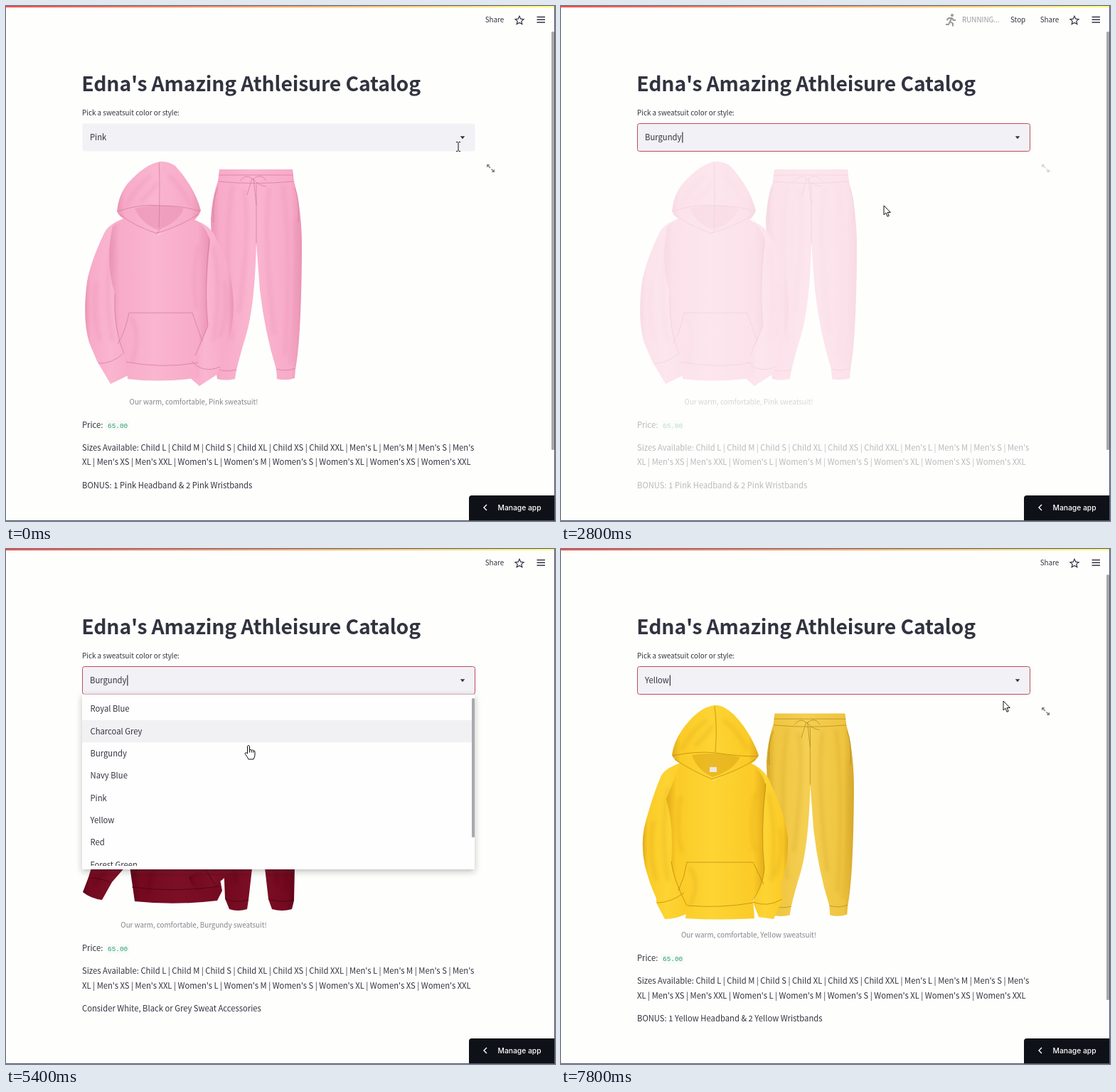
These frames come from a looping animation (772x725 px, 8000 ms). An HTML page:

```html
<!DOCTYPE html>
<html lang="en">
<head>
<meta charset="utf-8">
<title>Athleisure Catalog</title>
<style>
  html, body { margin: 0; width: 100%; height: 100%; overflow: hidden; background: #fefefd; }
  svg { display: block; }
  text { font: 11.26px "Noto Sans CJK JP", "Noto Sans CJK SC", "Noto Sans CJK KR", "Open Sans", sans-serif; fill: #31333f; white-space: pre; }
  .small { font-size: 9.84px; }
  .title { font-size: 28.35px; font-weight: 700; letter-spacing: -.005em; }
  .price { font: 9.4px "Liberation Mono", monospace; fill: #27a063; }
  .manage { font: 500 10.3px Inter, sans-serif; fill: #fff; }
  .status { font: 9.75px "Open Sans", sans-serif; fill: #e4e4e6; }
  .ink { fill: none; stroke: #31333f; stroke-width: 1.2; }
</style>
</head>
<body>
<svg id="stage" width="772" height="725" viewBox="0 0 772 725"></svg>
<script>
const options = ["Royal Blue", "Charcoal Grey", "Burgundy", "Navy Blue", "Pink", "Yellow", "Red", "Forest Green"];
const rowY = i => 209.5 + i * 31.35;
const stage = document.getElementById("stage");

// Layers: f = shaded fill, d = inner fill, s = soft fold, l = seam, t = label
const widePants = [
  "f M300 230H403L405 247Q417 290 416 350Q415 470 407 511L406 524Q394 528 381 525L380 511Q364 460 357 400L352 334Q350 420 338 462Q328 495 324 513L322 525Q309 528 297 525L294 500L288 300Q290 268 298 247Z",
  "s M318 255Q306 330 318 470M335 260Q344 310 328 430M370 258Q361 320 377 460M390 255Q402 350 392 490M408 300Q410 400 400 500",
  "l M298 247Q350 252 405 247M299 238H404M352 250V334M298 256Q290 270 292 305M406 256Q413 270 411 305M297 511Q310 516 324 512M380 511Q394 515 407 510M329 246Q338 235 347 244Q359 234 366 246M346 243L339 266M348 243L352 280M347 243Q355 253 366 254"
];
const pinkHoodie = [
  "f M166 299Q143 307 137 322Q119 360 114 388Q107 440 117 474L128 500L147 532L172 520L171 495L190 400Z",
  "f M262 300Q290 309 296 329Q316 362 319 406Q323 440 310 482L298 518L272 535L249 515L270 490L262 400Z",
  "f M166 299L214 322L262 299Q283 310 287 332Q279 400 284 450L271 486L272 523Q220 531 171 525Q170 506 166 490Q151 455 153 405Q139 360 150 310Z",
  "s M150 330Q137 400 149 470M127 390Q121 430 132 470M292 340Q303 400 292 470M307 390Q314 425 301 465M178 500Q190 460 176 440M270 340Q261 385 268 425",
  "l M166 490Q151 455 153 405M286 326Q278 400 284 450L266 492M173 432H262L276 472M173 432Q168 458 157 476M169 501Q220 511 270 502M130 503Q148 504 164 490M261 500Q277 518 301 508",
  "f M217 219Q196 222 171 250Q158 266 156 289Q160 300 184 309L212 322L252 309Q270 301 274 288Q266 256 238 225Q228 218 217 219Z",
  "d M181 285Q215 276 250 285Q242 306 213 315Q190 306 181 285Z",
  "s M170 280Q184 255 202 240M259 280Q246 253 230 240M190 274Q203 264 212 250",
  "l M215 220Q217 250 215 312M157 289Q190 278 215 281Q250 281 273 289M160 293Q180 310 212 320Q252 307 270 293M212 321L217 313"
];
const yellowHoodie = [
  "f M168 301Q145 309 140 321Q127 352 117 392Q112 418 118 446Q124 470 134 492V498L146 521Q163 521 180 512L175 480L190 400Z",
  "f M266 301Q289 311 296 333Q315 374 319 408Q320 440 309 474L312 493L299 521L278 518L270 497L280 470L262 400Z",
  "f M168 301L214 326L264 301Q284 312 288 334Q280 400 286 450Q284 474 270 494L272 520Q225 523 175 520L177 502Q161 480 155 440Q159 390 148 352Z",
  "s M150 338Q140 400 150 465M130 385Q122 425 134 465M292 345Q304 400 296 465M308 395Q314 425 302 458M168 350Q161 395 170 425M273 345Q266 390 272 425M182 500Q196 470 182 450",
  "l M155 440Q158 465 177 502M288 330Q280 400 286 450Q284 474 270 494M177 441H270L285 472M177 441Q174 462 165 481M178 502Q225 506 270 498M135 498Q154 498 173 484M270 497Q290 505 311 493",
  "f M217 220Q200 221 182 240Q159 265 156 290Q160 301 184 310L213 326L252 309Q274 302 278 290Q266 257 243 233Q228 219 217 220Z",
  "d M184 290Q216 285 252 293Q242 312 213 321Q191 311 184 290Z",
  "s M170 281Q184 256 203 242M261 281Q247 254 230 242M190 275Q203 264 212 250",
  "l M216 221Q220 250 217 286M157 291Q190 284 217 287Q250 292 277 292M160 296Q182 311 212 324Q252 311 273 296",
  "t M209 307H219V314H209Z"
];
const slimPants = [
  "f M308 226H400L403 245Q410 290 408 350L405 495L402 507Q388 511 374 507L369 493L355 370L341 494L339 507Q326 511 314 507L308 492L301 310Q301 260 308 226Z",
  "s M318 260Q313 350 323 470M338 260Q344 330 331 450M373 260Q366 330 382 470M395 260Q400 350 393 480",
  "l M306 239Q350 243 402 239M307 232H401M354 242L355 372M309 247Q302 265 305 300M403 248Q408 270 406 300M308 493Q325 499 341 494M369 493Q388 499 405 494M342 240Q350 229 356 239Q364 229 371 240M355 238L344 258M357 238L364 262"
];
const slimHoodie = [
  "f M203 294Q178 305 169 323Q149 358 140 398L137 424Q121 440 116 462L108 483Q119 492 135 494L149 469L175 439L186 350Z",
  "f M204 292L240 318L286 294Q307 308 317 335Q331 375 329 414L300 460L304 481L297 495Q238 502 181 496L173 440Q181 380 177 340Q187 308 204 292Z",
  "f M316 340Q333 384 330 420Q328 447 313 458Q294 475 273 486Q262 477 257 462L281 447Q310 422 316 340Z",
  "s M194 335Q186 390 190 420M282 345Q292 390 280 424M161 380Q148 420 158 444M126 470L149 440M207 450L200 482M311 405Q312 432 291 454M270 370L255 405",
  "l M203 298Q175 322 181 370L173 440M192 416Q239 421 287 416L291 444M192 416L184 450L182 459M177 476Q240 484 300 475M116 463Q135 463 148 470M279 448Q287 462 294 473M317 343Q307 420 282 446",
  "f M241 228Q228 229 210 246Q194 262 190 286Q198 297 220 298L239 310L263 298Q285 295 290 284Q282 253 260 235Q251 227 241 228Z",
  "d M205 294Q240 280 276 293L241 315Z",
  "s M207 276Q220 253 235 245M276 275Q264 253 250 244",
  "l M240 228Q244 250 239 281M191 288Q215 281 240 283Q266 280 289 286M195 294Q218 300 238 315Q260 297 284 293M233 317Q240 306 242 318Q237 328 232 320M243 317Q247 308 251 317Q249 328 242 319",
  "t M234 300H243V307H234Z"
];

function garment(id, [light, base, dark, seam], layers, transform = "") {
  const stops = [[0, dark], [.1, base], [.45, light], [.88, base], [1, dark]];
  const paint = {
    f: `fill="url(#${id})"`,
    d: `fill="${dark}" opacity=".6"`,
    s: `fill="none" stroke="${dark}" stroke-width="5" stroke-linecap="round" opacity=".35" filter="url(#soft)"`,
    l: `fill="none" stroke="${seam}" stroke-width="1" opacity=".7"`,
    t: `fill="#eee8e0"`
  };
  return `<linearGradient id="${id}">${stops.map(([o, c]) => `<stop offset="${o}" stop-color="${c}"/>`).join("")}</linearGradient>
    <g transform="${transform}">${layers.map(s => `<path d="${s.slice(2)}" ${paint[s[0]]}/>`).join("")}</g>`;
}
const label = (x, y, s, cls = "", id = "") => `<text x="${x}" y="${y}" class="${cls}" id="${id}">${s}</text>`;

const pink = ["#fab5cf", "#f7abc8", "#e993b3", "#d2779b"];
const burgundy = ["#7c0f26", "#74091f", "#5a0617", "#3d0410"];
const yellow = ["#fdd433", "#fbcb27", "#e0a91a", "#b5830a"];
const paleYellow = ["#f5cf52", "#efc540", "#d6a62b", "#ad8118"];

stage.innerHTML = `
<defs>
  <linearGradient id="bar"><stop stop-color="#ff4b4b"/><stop offset="1" stop-color="#fffd80"/></linearGradient>
  <filter id="soft" x="-20%" y="-20%" width="140%" height="140%"><feGaussianBlur stdDeviation="2.5"/></filter>
  <filter id="shadow" x="-5%" y="-10%" width="110%" height="125%"><feDropShadow dx="0" dy="3" stdDeviation="4" flood-color="#262730" flood-opacity=".3"/></filter>
  <clipPath id="listClip"><path d="M107 205H655V446H107Z"/></clipPath>
</defs>
<path d="M0 0H772V725H0Z" fill="#fefefd"/>
<path d="M0 0H771V2H0Z" fill="url(#bar)"/>
<g id="running">
  <g fill="#999"><circle id="head" cy="13" r="2.1"/><path id="pose" fill="none" stroke="#999" stroke-width="2" stroke-linejoin="round"/></g>
  <g opacity=".5">${label(564, 23, "RUNNING...", "small")}</g>${label(632, 23, "Stop", "small")}
</g>
${label(673.7, 23, "Share", "small")}
<path class="ink" d="M722 14.2L723.8 18.2L728 18.6L724.8 21.4L725.8 25.6L722 23.4L718.2 25.6L719.2 21.4L716 18.6L720.2 18.2Z"/>
<path class="ink" style="stroke-width:1.5" d="M746.5 15.5H758M746.5 19.2H758M746.5 23H758"/>
${label(106.3, 120.3, "Edna's Amazing Athleisure Catalog", "title")}
${label(107, 154, "Pick a sweatsuit color or style:", "small")}
<rect id="box" x="107.5" y="165.5" width="552" height="39" rx="3" fill="#f1f1f6"/>
${label(118, 189, "", "", "value")}
<path id="caret" class="ink" d="M0 177.5V192.5"/>
<path d="M638.8 183.3H645.2L642 187.2Z" fill="#31333f"/>
<g id="picture">
  <g id="Pink">${garment("pinkPants", pink, widePants)}${garment("pinkTop", pink, pinkHoodie)}</g>
  <g id="Burgundy">${garment("redPants", burgundy, slimPants)}${garment("redTop", burgundy, slimHoodie)}</g>
  <g id="Yellow">${garment("yellowPants", paleYellow, widePants, "translate(12.5 10) scale(.96 .963)")}${garment("yellowTop", yellow, yellowHoodie)}</g>
  <g id="caption" opacity=".6">${label(264, 560.5, "", "small", "captionText")}</g>
  <g id="expand" stroke="#808087" fill="#808087"><path d="M678 225L681 228M682.5 229.5L685 232" stroke-width="1.5"/><path d="M676 223H680.5L676 227.5ZM687 234H682.5L687 229.5Z" stroke="none"/></g>
</g>
<g id="details">
  ${label(107, 593.5, "Price:")}
  <rect x="140.5" y="583" width="33" height="14" rx="2" fill="#f8f9fb"/>${label(143, 593.5, "65.00", "price")}
  ${label(107, 625.7, "Sizes Available: Child L | Child M | Child S | Child XL | Child XS | Child XXL | Men's L | Men's M | Men's S | Men's")}
  ${label(107, 646, "XL | Men's XS | Men's XXL | Women's L | Women's M | Women's S | Women's XL | Women's XS | Women's XXL")}
  ${label(107, 678.7, "", "", "bonus")}
</g>
<g id="menu">
  <rect x="107" y="204.5" width="552" height="246.5" rx="2" fill="#fefefe" filter="url(#shadow)"/>
  <rect id="hover" x="107" width="548" height="31.3" fill="#f1f1f4"/>
  <g clip-path="url(#listClip)">${options.map((s, i) => label(118.5, rowY(i) + 19.7, s)).join("")}</g>
  <rect x="655" y="210" width="4" height="196" rx="1.5" fill="#a9a9ae"/>
</g>
<rect id="thumb" x="767" y="36" width="4" rx="1.5" fill="#a9a9a9"/>
<path d="M651 725V693Q651 689 655 689H772V725Z" fill="#0e1117"/>
<path d="M676 702L672 706L676 710" fill="none" stroke="#fff" stroke-width="1.4"/>
${label(691.5, 709.7, "Manage app", "manage")}
<path d="M0 724.5H771.5V0" fill="none" stroke="#55566a"/>
<g id="status"><path d="M0 706H252Q255 706 255 709V725H0Z" fill="#1f2023"/>${label(4, 719, "Waiting for share.streamlit.io...", "status")}</g>
<g id="cursor" stroke="#111" stroke-width="1" stroke-linejoin="round" fill="#fff">
  <path id="beam" fill="none" d="M-3 -6.5H-1L0 -5.5L1 -6.5H3M0 -5.5V5.5M-3 6.5H-1L0 5.5L1 6.5H3"/>
  <path id="arrow" d="M0 0V13L3 10.2L5 15.3L7.2 14.4L5.1 9.5H9.3Z"/>
  <path id="hand" d="M-1.5 12V1.5Q0 -.8 1.5 1.5V7Q3 5.6 4.2 7.3Q5.6 6.2 6.8 8Q8.6 7.2 9 9.3V14Q8.6 17 7 20H0Q-1.5 16.5 -5 12.2Q-4.4 9.3 -1.5 12ZM1.5 7V10.5M4.2 7.5V10.5M6.8 8.2V10.8"/>
</g>`;

const el = {};
stage.querySelectorAll("[id]").forEach(n => { el[n.id] = n; });
el.captionText.setAttribute("text-anchor", "middle");

const path = [[0, 636, 198], [200, 640, 187], [800, 640, 187], [1400, 454, 281], [3000, 454, 281], [4000, 645, 185],
  [4400, 645, 185], [5400, 341, 276], [5800, 288, 389], [6800, 288, 389], [7600, 622, 214], [8000, 622, 214]];
const shift = { Pink: 0, Burgundy: -27.3, Yellow: -13.3 };
const poses = [
  [548, "M541 17.5H555M548 17V22M546.3 18V28M549.7 18V28"],
  [550, "M549.5 16.5L547 22L551 24.5V28.5M547 22L545 26H541M542.5 20L545 17H549.5L552 20H555"],
  [551, "M549.5 16L546 21L551 24L554 28M546 21L542 25L544 28M550 17L553 21L547 24"]
];

const clamp = v => Math.min(1, Math.max(0, v));
const during = (t, a, b) => t >= a && t < b;
const show = (id, on) => { el[id].style.display = on ? "" : "none"; };
const set = (id, key, v) => el[id].setAttribute(key, v);

function pointer(t) {
  const i = path.findIndex(p => p[0] > t);
  const [a, x, y] = path[i - 1], [b, u, v] = path[i];
  const k = (t - a) / (b - a), e = k * k * (3 - 2 * k);
  return [x + (u - x) * e, y + (v - y) * e];
}

function draw(t) {
  const [x, y] = pointer(t);
  const choice = t < 1600 ? "Pink" : t < 5800 ? "Burgundy" : "Yellow";
  const page = t < 3200 ? "Pink" : t < 6800 ? "Burgundy" : "Yellow";
  const open = during(t, 200, 1600) || during(t, 4600, 5800);
  const focus = during(t, 200, 3600) || t >= 4600;

  // Form; the highlighted option lags one step behind the pointer
  el.value.textContent = choice;
  set("box", "stroke", focus ? "#c04a5c" : "none");
  show("caret", focus);
  set("caret", "transform", `translate(${119.5 + el.value.getComputedTextLength()} 0)`);
  show("menu", open);
  const row = Math.floor((pointer(Math.max(0, t - 200))[1] - rowY(0)) / 31.35);
  set("hover", "y", rowY(row < 0 ? options.indexOf(choice) : row));

  // Page contents, dimmed while the app reruns
  const fade = t < 3200 ? clamp((t - 1800) / 800) : during(t, 6000, 6800) ? clamp((t - 6000) / 600) : 0;
  const dim = 1 - .67 * fade;
  const redrawn = during(t, 6600, 6800);
  set("details", "opacity", dim);
  set("picture", "opacity", redrawn ? 1 : dim);
  for (const name in shift) show(name, name === page);
  const move = `translate(0 ${shift[page]})`;
  set("details", "transform", move);
  set("caption", "transform", move);
  el.captionText.textContent = `Our warm, comfortable, ${redrawn ? choice : page} sweatsuit!`;
  el.bonus.textContent = page === "Burgundy" ? "Consider White, Black or Grey Sweat Accessories"
    : `BONUS: 1 ${page} Headband & 2 ${page} Wristbands`;
  show("expand", t < 200 || during(t, 1600, 3200) || t >= 5800);

  // Browser and app chrome
  show("running", during(t, 1800, 3400) || during(t, 6000, 7000));
  set("running", "opacity", t === 1800 || t === 6000 ? .6 : 1);
  const [headX, d] = poses[t < 2000 ? 0 : [2, 0, 1][t / 200 % 3]];
  set("head", "cx", headX);
  set("pose", "d", d);
  show("thumb", !open);
  set("thumb", "height", { Pink: 589, Burgundy: 609, Yellow: 599 }[page]);
  show("status", during(t, 1800, 2200));

  const onBox = y < 204 && x < 659;
  const shape = t < 200 ? "beam" : open || onBox ? "hand" : "arrow";
  for (const name of ["beam", "arrow", "hand"]) show(name, name === shape);
  set("cursor", "transform", `translate(${x} ${y})`);
}

const start = performance.now();
function tick(now) {
  const t = Math.max(0, now - start) % 8000;
  draw(Math.floor(t / 200) * 200);
  requestAnimationFrame(tick);
}
tick(start);
</script>
</body>
</html>
```
